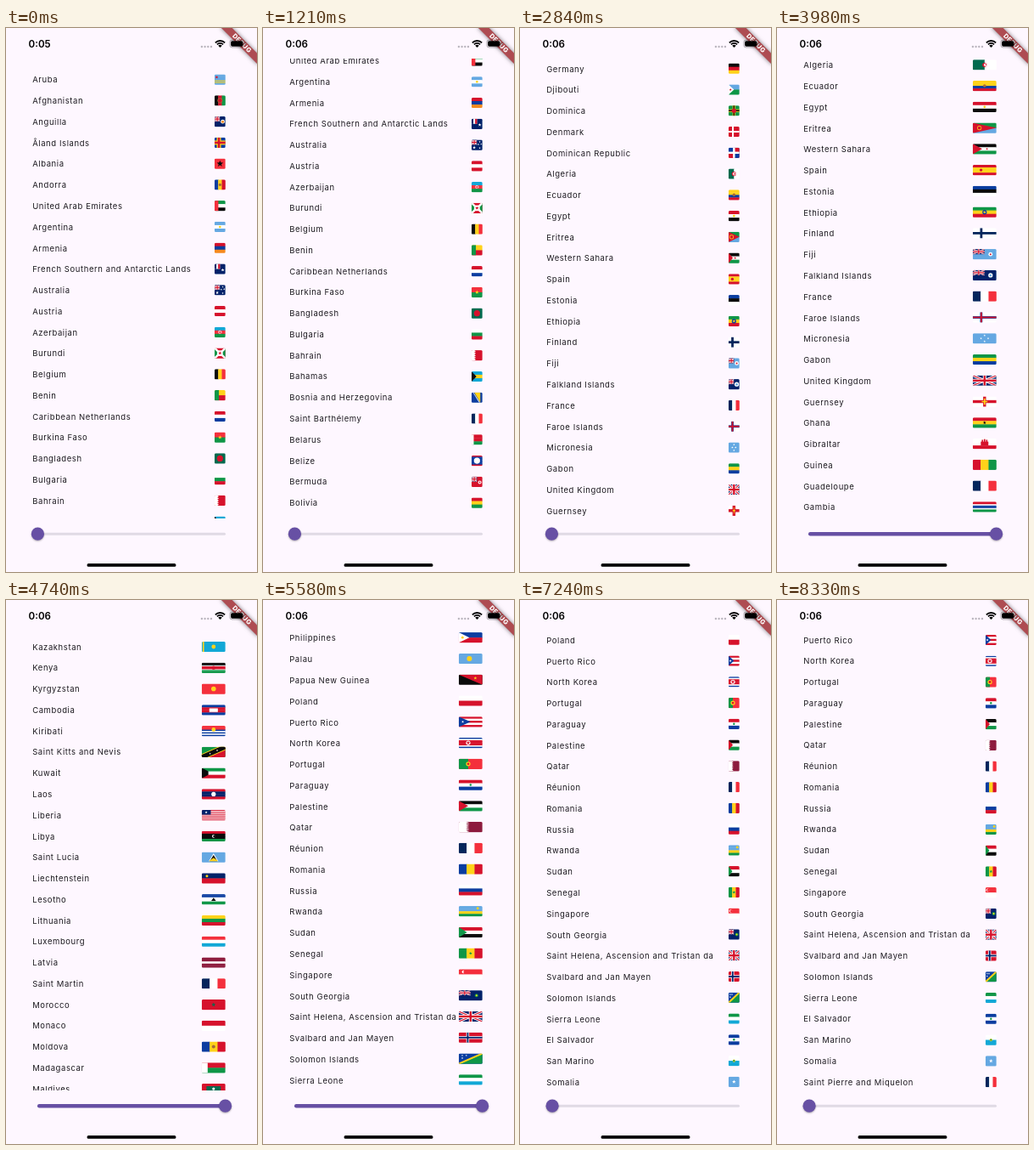
These frames come from a looping animation (296 by 640 pixels, 9410 ms). An HTML page with a canvas:

```html
<!DOCTYPE html>
<html lang="en">
<head>
<meta charset="utf-8">
<title>Country list</title>
<style>
  html, body { margin: 0; width: 100%; height: 100%; overflow: hidden; background: #fef7ff; }
  body { position: relative; font-family: Inter, "Liberation Sans", sans-serif; }
  #view { position: absolute; left: 0; top: 36px; width: 296px; height: 541px; overflow: hidden; }
  #names { position: absolute; left: 31.2px; top: 13.4px; white-space: pre; color: #1d1b20;
           font-size: 9.5px; letter-spacing: .58px; }
  #clock { position: absolute; left: 26.6px; top: 11px; font-size: 11.6px; font-weight: 600; line-height: 16px; color: #000; }
  #corner { position: absolute; left: 0; top: 0; width: 296px; height: 640px; overflow: hidden; }
  #banner { position: absolute; left: 265.6px; top: 21.2px; width: 60.8px; height: 9.2px; transform-origin: 30.4px -21.2px;
            transform: rotate(45deg); background: #ae4c52; box-shadow: 0 0 5px rgba(0,0,0,.5);
            color: #fff; font-size: 7.6px; font-weight: 800; letter-spacing: .4px; line-height: 9.2px; text-align: center; }
  canvas { position: absolute; left: 0; top: 0; width: 296px; height: 640px; }
</style>
</head>
<body>
<div id="view"><div id="names"></div></div>
<div id="corner"><div id="banner">DEBUG</div></div>
<div id="clock"></div>
<canvas id="stage"></canvas>
<script>
// name = flag layers: stripes (- |), disc o, star *, cross +, saltire x, diagonals / ~,
// hoist triangle >, rectangle #, polygon P, toothed edge z, union canton U
const COUNTRIES = `Aruba=-sssssssysyss *r2,20,28
Afghanistan=|krg op3 or2.2
Anguilla=-n Un50 ow2.4,75 oo1.5,75
Åland Islands=-b +y5,40 +r2.5,40
Albania=-f *k4
Andorra=|byr op1.6
United Arab Emirates=-gwk #f0,0,35,100
Argentina=-sws oy1.3
Armenia=-rbo
French Southern and Antarctic Lands=-n #w0,0,50,50 #r33,0,17,50 #n0,0,17,50 *w2,75,60
Australia=-n Un50 *w2,25,75 *w1.2,75,20 *w1.2,75,80 *w1.2,62,45 *w1.2,88,42
Austria=-rwr
Azerbaijan=-cfg ow2 of1.6,54 *w1.2,60
Burundi=-r >g50 Pg100,0,50,50,100,100 xw2.4 ow3.4 *r2.2
Belgium=|kyf
Benin=-yr #g0,0,40,100
Caribbean Netherlands=-rwb
Burkina Faso=-fg *y2.4
Bangladesh=-e or3.6
Bulgaria=-wgr
Bahrain=-r zw25
Bahamas=-cyc >k45
Bosnia and Herzegovina=-b Py25,0,80,0,80,100 Pw12,0,18,0,78,100,70,100
Saint Barthélemy=|dwf
Belarus=-rrg #w0,0,20,100
Belize=-rbbbbbbr ow3.6
Bermuda=-r Un50 ow2,75,55 or.9,75,55
Bolivia=-ryg
Brazil=-g Py50,8,94,50,50,92,6,50 ob2.6
Barbados=|byb *k2
Brunei=-y ~w5 ~k2 or2
Bhutan=-o Py0,0,100,0,0,100 /w2
Bouvet Island=-r +w4,38 +n2,38
Botswana=-sswkwss
Central African Republic=-bwgy #r42,0,16,100 *y1.3,18,14
Canada=|rwwr *r3
Cocos Islands=-g oy2,25,30 *w1.3,72
Switzerland=-r #w41,20,18,60 #w22,41,56,18
Chile=-wr #b0,0,35,50 *w2,17,25
China=-r *y2.6,22,30
Ivory Coast=|owg
Cameroon=|gry *y2
DR Congo=-s /y5 /r3 *y2,18,25
Congo=-g Pr100,0,100,100,0,100 /y4
Cook Islands=-n Un50 ow2.2,75
Colombia=-yybr
Comoros=-ywrb >g45
Cape Verde=-bbbbwrwbb *y1.6,38,66
Costa Rica=-bwrrwb
Cuba=-bwbwb >r45 *w1.5,15
Curaçao=-bbbbbybb *w1.6,22,25
Christmas Island=-b Pg0,0,100,0,100,100 oy2
Cayman Islands=-n Un50 ow2.2,75
Cyprus=-w *o3
Czechia=-wr >b50
Germany=-kry
Djibouti=-sg >w50 *r1.6,18
Dominica=-g +y3.2,50 +k1.6,50 or2.6
Denmark=-r +w2,40
Dominican Republic=-br #r50,0,50,50 #b50,50,50,50 +w2.4,50
Algeria=|ew or2.6 ow1.9,54 *r1.4,56
Ecuador=-yybr op1.8
Egypt=-rwk oy1.4
Eritrea=-gs >r100 oy2.6,28 or1.9,28
Western Sahara=-kwg >r40 *r1.5,60
Spain=-ryyr or1.7,35
Estonia=-bkw
Ethiopia=-gyr ob2.6 *y2
Finland=-w +d2.8,36
Fiji=-s Un50 ow2.4,75 or1,75
Falkland Islands=-n Un50 ow2.6,75 os1.3,75
France=|dwf
Faroe Islands=-w +b2.8,36 +r1.7,36
Micronesia=-s *w1.3,50,22 *w1.3,50,78 *w1.3,35 *w1.3,65
Gabon=-gyb
United Kingdom=Un100
Guernsey=-w +r3.4,50 #y38,44,24,12 #y47,20,6,60
Ghana=-ryg *k2
Gibraltar=-wwr #r34,30,32,36 #r38,12,6,30 #r47,6,6,30 #r56,12,6,30
Guinea=|ryg
Guadeloupe=|dwf
Gambia=-rrwbbwgg
Guinea-Bissau=-yg #r0,0,35,100 *k2,17
Equatorial Guinea=-gwr >b28
Greece=-bwbwbwbwb #b0,0,40,55
Grenada=-r #y10,12,80,76 or2.5
Greenland=-wr or3,38
Guatemala=|sws og1.5
French Guiana=|dwf
Guam=-n oy2.6 ob2
Guyana=-g >w100 >y92 >k52 >r46
Hong Kong=-r *w3
Honduras=-bwb *b1.2
Croatia=-rwb or2
Haiti=-br #w36,30,28,40
Hungary=-rwg
Indonesia=-rw
Isle of Man=-r *w3
India=-owg ob1.4
British Indian Ocean Territory=-wbwbwbwb Un50
Ireland=|gwo
Iran=-gwr or1.3
Iraq=-rwk og1.1
Iceland=-b +w3.4,38 +r1.8,38
Israel=-wbwwwbw *b2
Italy=|gwr
Jamaica=-g >k50 Pk100,0,50,50,100,100 xy2.2
Jersey=-w xr2
Jordan=-kwg >r50
Japan=-w or3.2
Kazakhstan=-c oy2.4 #y4,0,6,100
Kenya=-kkkkwrrrrwgggg or2.2
Kyrgyzstan=-f oy2.8
Cambodia=-brrb #w32,35,36,35
Kiribati=-fffbwbwb oy2.4,50,36
Saint Kitts and Nevis=-g Pr0,100,100,0,100,100 /y7 /k5.2 *w1.2,35,65 *w1.2,65,35
Kuwait=-gwr Pk0,0,28,33,28,67,0,100
Laos=-rnnr ow2.6
Liberia=-rwrwrwrwrwr #n0,0,38,45 *w1.6,19,23
Libya=-rkkg ow1.8 ok1.4,53
Saint Lucia=-s Pw50,12,70,88,30,88 Pk50,28,66,88,34,88 Py50,55,70,88,30,88
Liechtenstein=-nr oy1.5,22,28
Lesotho=-bbbwwwwggg Pk50,34,60,64,40,64
Lithuania=-ygr
Luxembourg=-fwc
Latvia=-mmwmm
Saint Martin=|dwf
Morocco=-r *e2.6
Monaco=-rw
Moldova=|byr op2
Madagascar=-rg #w0,0,25,100
Maldives=-r #e20,25,60,50 ow1.6
Mexico=|gwr op1.6
Marshall Islands=-n /w3
North Macedonia=-r +y2,50 xy1.6 or2.6 oy2
Mali=|gyr
Malta=|wr
Myanmar=-ygr *w3.6
Montenegro=-r oy3
Mongolia=|rbr oy1.6,17
Northern Mariana Islands=-b ow2.6
Mozambique=-gwkwy >r42 *y1.8,14
Mauritania=-rggggr oy2
Montserrat=-n Un50 og2.2,75
Martinique=|dwf
Mauritius=-rbyg
Malawi=-krg or2,50,25
Malaysia=-rwrwrwrw #b0,0,50,55 oy2,22,28
Mayotte=|dwf
Namibia=-b Pg0,100,100,0,100,100 /w5 /r3 oy1.8,20,28
New Caledonia=-brg oy2.6,38
Niger=-owg oo1.5
Norfolk Island=|gwg *g2
Nigeria=|gwg
Nicaragua=-bwb oy1.2
Niue=-y Un50
Netherlands=-rwb
Norway=-r +w3.4,38 +n1.8,38
Nepal=-w Pr0,0,80,50,30,50,80,100,0,100
Nauru=-bbbybbb *w1.6,25,78
New Zealand=-n Un50 *r1.2,75,20 *r1.2,75,80 *r1.2,62,45 *r1.2,88,42
Oman=-wrg #r0,0,28,100
Pakistan=-e #w0,0,25,100 ow2.2,62 oe1.8,66
Panama=-w #r50,0,50,50 #b0,50,50,50 *b1.5,25,25 *r1.5,75,75
Pitcairn Islands=-n Un50 og2.2,75
Peru=|rwr
Philippines=-br >w45 oy1.4,16
Palau=-s oy3,45
Papua New Guinea=-k Pr0,0,100,0,100,100 *y2,70,35
Poland=-wr
Puerto Rico=-rwrwr >b50 *w1.6,17
North Korea=-bwrrrrwb ow2.6,40 *r2.4,40
Portugal=-f #g0,0,40,100 oy2.6,40 or1.4,40
Paraguay=-rwb og1.2
Palestine=-kwg >r40
Qatar=-m zw30
Réunion=|dwf
Romania=|byr
Russia=-wbr
Rwanda=-ssyg oy1.4,80,22
Sudan=-rwk >g35
Senegal=|gyr *g2
Singapore=-fw ow1.8,20,26 of1.5,25,26
South Georgia=-n Un50 og2,75 oy1,75
Saint Helena, Ascension and Tristan da=Un100
Svalbard and Jan Mayen=-r +w3.4,38 +n1.8,38
Solomon Islands=-b Pg0,100,100,0,100,100 /y2 *w1.2,15,20 *w1.2,32,20 *w1.2,15,45
Sierra Leone=-gwc
El Salvador=-bwb og1.2
San Marino=-wc oy1.6 og1
Somalia=-s *w2.4
Saint Pierre and Miquelon=|dwf`.split('\n').map(line => line.split('='));

const COLORS = { r: '#d6122c', f: '#f4303c', w: '#fff', b: '#0b3da0', n: '#012169', d: '#05265c', g: '#0f9647',
                 e: '#006a4e', y: '#ffd21a', k: '#0b0b0b', s: '#65a8e2', o: '#f58a1f', m: '#8d1b3d',
                 c: '#12a8d6', p: '#a56a3a' };
const LOOP = 9410, ROW = 1585 / 64, FLAG_H = 12.2, PURPLE = '#6750a4';
const SCROLL = [[780, 0], [1210, 6.87], [1760, 28], [2300, 48], [2720, 55.52], [3700, 55.52], [3980, 60.67],
                [4360, 88], [4740, 110.16], [5200, 144], [5720, 169.56], [7420, 169.56], [8330, 170.55]];
const SLIDER = [[2900, 0], [3550, 1], [5800, 1], [6350, .296], [7000, .003]];
const PRESSES = [[2860, 3620], [5760, 7250]];

const $ = id => document.getElementById(id);
const g = $('stage').getContext('2d');
const dpr = window.devicePixelRatio || 1;
$('stage').width = 296 * dpr;
$('stage').height = 640 * dpr;
$('names').style.lineHeight = ROW + 'px';
$('names').textContent = COUNTRIES.map(c => c[0]).join('\n');

const clamp = v => Math.max(0, Math.min(1, v));

// Monotone cubic through [time, value] keys
function track(keys, t) {
  const last = keys.length - 1;
  if (t <= keys[0][0]) return keys[0][1];
  if (t >= keys[last][0]) return keys[last][1];
  const i = keys.findIndex(k => k[0] > t) - 1;
  const slope = j => j < 0 || j >= last ? 0 : (keys[j + 1][1] - keys[j][1]) / (keys[j + 1][0] - keys[j][0]);
  const tangent = j => {
    const a = slope(j - 1), b = slope(j);
    return a * b > 0 ? 2 * a * b / (a + b) : 0;
  };
  const [t0, a] = keys[i], [t1, b] = keys[i + 1], d = t1 - t0, u = (t - t0) / d, v = 1 - u;
  return a * v * v * (1 + 2 * u) + b * u * u * (1 + 2 * v) + d * u * v * (tangent(i) * v - tangent(i + 1) * u);
}

function disc(x, y, r, color) {
  g.fillStyle = color;
  g.beginPath();
  g.arc(x, y, r, 0, 7);
  g.fill();
}

function pill(x, y, w, h, r, color) {
  g.fillStyle = color;
  g.beginPath();
  g.roundRect(x, y, w, h, r);
  g.fill();
}

function poly(points) {
  g.beginPath();
  points.forEach(p => g.lineTo(...p));
  g.fill();
}

function line(width, ...p) {
  g.lineWidth = width;
  g.beginPath();
  g.moveTo(p[0], p[1]);
  g.lineTo(p[2], p[3]);
  g.stroke();
}

const H = FLAG_H;
const SHAPES = {
  o: (w, r, x = 50, y = 50) => disc(w * x / 100, H * y / 100, r, g.fillStyle),
  '*': (w, r, x = 50, y = 50) => poly([...Array(10).keys()].map(i => {
    const a = i * Math.PI / 5, d = i % 2 ? r * .42 : r;
    return [w * x / 100 + d * Math.sin(a), H * y / 100 - d * Math.cos(a)];
  })),
  '+': (w, d, x) => {
    g.fillRect(w * x / 100 - d / 2, 0, d, H);
    g.fillRect(0, (H - d) / 2, w, d);
  },
  '/': (w, d) => line(d, 0, H, w, 0),
  '~': (w, d) => line(d, 0, 0, w, H),
  x: (w, d) => { SHAPES['/'](w, d); SHAPES['~'](w, d); },
  '>': (w, x) => poly([[0, 0], [w * x / 100, H / 2], [0, H]]),
  '#': (w, x, y, dx, dy) => g.fillRect(w * x / 100, H * y / 100, w * dx / 100, H * dy / 100),
  P: (w, ...n) => poly(n.filter((_, i) => i % 2 == 0).map((x, i) => [w * x / 100, H * n[2 * i + 1] / 100])),
  z: (w, x) => poly([[0, 0], ...[...Array(11).keys()].map(i => [w * (x + i % 2 * 15) / 100, H * i / 10]), [0, H]]),
  U: (w, size) => {
    g.save();
    g.scale(size / 100, size / 100);
    g.fillRect(0, 0, w, H);
    g.beginPath();
    g.rect(0, 0, w, H);
    g.clip();
    [['x', 'w', 3], ['x', 'r', 1.1], ['+', 'w', 4.1], ['+', 'r', 2.4]].forEach(([op, c, d]) => {
      g.fillStyle = g.strokeStyle = COLORS[c];
      SHAPES[op](w, d, 50);
    });
    g.restore();
  }
};

function stripes(letters, w, across) {
  const n = letters.length;
  [...letters].forEach((c, i) => {
    g.fillStyle = COLORS[c];
    // a slight overlap hides the seams
    if (across) g.fillRect(0, H * i / n, w, H / n + .4);
    else g.fillRect(w * i / n, 0, w / n + .4, H);
  });
}

function drawFlag(spec, x, y, w) {
  g.save();
  g.translate(x, y);
  g.beginPath();
  g.roundRect(0, 0, w, H, 1.5);
  g.clip();
  for (const layer of spec.split(' ')) {
    const op = layer[0];
    if (op == '-' || op == '|') { stripes(layer.slice(1), w, op == '-'); continue; }
    g.fillStyle = g.strokeStyle = COLORS[layer[1]];
    SHAPES[op](w, ...layer.slice(2).split(',').map(Number));
  }
  g.restore();
}

function drawFlags(scroll, value) {
  const w = 12.9 + 15.1 * value;
  g.save();
  g.beginPath();
  g.rect(0, 36, 296, 541);
  g.clip();
  COUNTRIES.forEach(([, spec], i) => {
    const y = 54.5 + ROW * (i - scroll);
    if (y > 20 && y < 580) drawFlag(spec, 258.8 - w, y, w);
  });
  g.restore();
}

function drawSlider(value, press) {
  const x = 37.4 + 221.2 * value, y = 595.2;
  pill(37, y - 1.5, 222, 3, 1.5, '#e0dae5');
  if (value > .01) pill(37, y - 2.2, x - 37, 4.4, 2.2, PURPLE);
  if (press > 0) disc(x, y, 18.2 * press, 'rgba(103,80,164,.12)');
  g.save();
  g.shadowColor = 'rgba(0,0,0,.3)';
  g.shadowBlur = 2 * dpr;
  g.shadowOffsetY = dpr;
  disc(x, y, 7.6, PURPLE);
  g.restore();
}

function drawSystem() {
  for (let i = 0; i < 4; i++) disc(230.9 + 3.7 * i, 22, 1.2, '#bbb6bf');
  g.strokeStyle = '#000';
  [[8, 1.8], [5.1, 1.8], [1.6, 3.2]].forEach(([r, width]) => {
    g.lineWidth = width;
    g.beginPath();
    g.arc(252.5, 23, r, -Math.PI * .75, -Math.PI * .25);
    g.stroke();
  });
  g.strokeStyle = 'rgba(0,0,0,.4)';
  g.lineWidth = .8;
  g.beginPath();
  g.roundRect(263.9, 14.1, 16.8, 8.8, 2.6);
  g.stroke();
  pill(265.1, 15.3, 14.4, 6.4, 1.6, '#000');
  pill(281.7, 17, 1, 3, .5, 'rgba(0,0,0,.45)');
  pill(95.5, 630, 105, 3.8, 1.9, '#000');
}

function frame(now) {
  const t = now % LOOP;
  const scroll = track(SCROLL, t), value = track(SLIDER, t);
  const press = Math.max(...PRESSES.map(([a, b]) => Math.min(clamp((t - a) / 100), clamp((b - t) / 100))));
  $('names').style.transform = `translateY(${-scroll * ROW}px)`;
  $('clock').textContent = t < 370 ? '0:05' : '0:06';
  g.setTransform(dpr, 0, 0, dpr, 0, 0);
  g.clearRect(0, 0, 296, 640);
  drawFlags(scroll, value);
  drawSlider(value, press);
  drawSystem();
  requestAnimationFrame(() => frame(performance.now() - start));
}
const start = performance.now();
frame(0);
</script>
</body>
</html>
```
